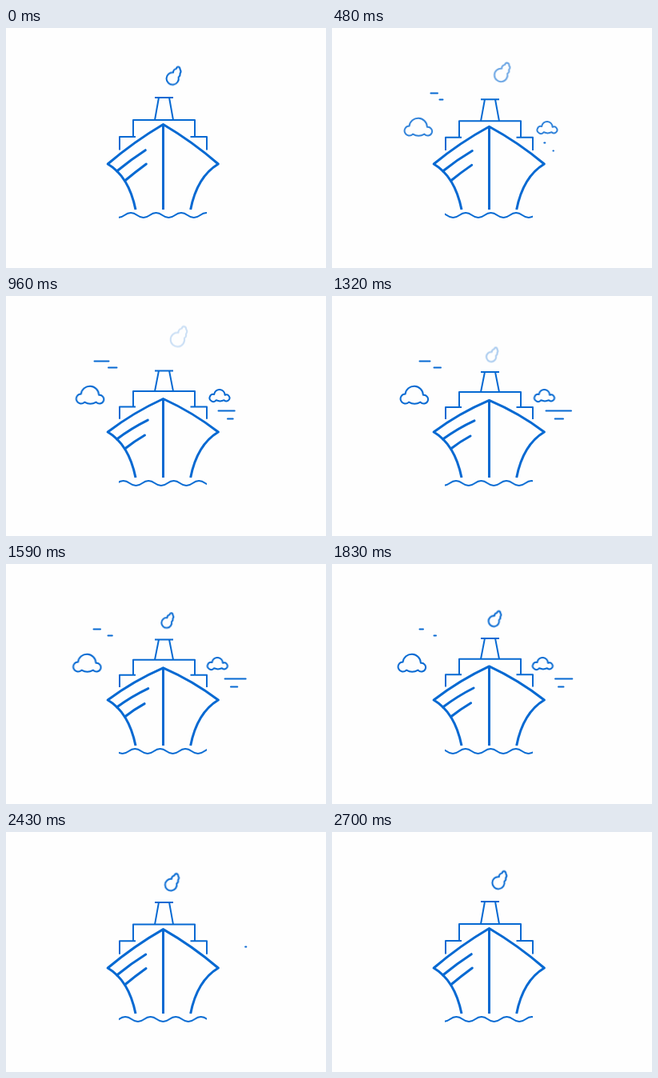
Animation of 400 by 300 pixels, one loop 2730 ms. Source, as an HTML page:

```html
<!DOCTYPE html>
<html lang="en">
<head>
<meta charset="utf-8">
<title>Ship at sea</title>
<style>
  html, body { margin: 0; width: 100%; height: 100%; overflow: hidden; background: #fefefe; }
  svg { display: block; width: 100%; height: 100%; }
  .art { fill: none; stroke: #0669d2; stroke-width: 2; stroke-linejoin: round; }
  .bold { stroke-width: 3; }
  .round { stroke-linecap: round; }

  /* Ship: each outline swings between two poses */
  .ship path { animation: 1365ms cubic-bezier(.37, 0, .63, 1) infinite alternate; }
  .ship .side { animation-name: side; }
  .ship .deck { animation-name: deck; }
  .ship .funnel { animation-name: funnel; }
  .ship .hull { animation-name: hull; }
  .ship .stripes { animation-name: stripes; }
  @keyframes side { to { d: path("M142 154V139H162M251 154V139H230.5"); } }
  @keyframes deck { to { d: path("M159 139V120H236V139M174 120H213"); } }
  @keyframes funnel { to { d: path("M186 95H209M191 95L186 120M204 95L209 120"); } }
  @keyframes hull {
    to { d: path("M162 227C156.5 200 146 181 127.2 170Q159 146.5 196.5 130.5Q234 146.5 265.3 170C247 181 236 200 230.7 227M196.5 130.5V227"); }
  }
  @keyframes stripes { to { d: path("M138.5 179Q157 165.5 178 155.8M148.5 191Q160 182 173 175"); } }

  /* Sea */
  .wave { animation: roll 1365ms linear infinite; }
  @keyframes roll { to { transform: translateX(31.5px); } }

  /* Smoke */
  .smoke {
    transform-origin: 208.1px 63.75px;
    vector-effect: non-scaling-stroke;
    animation: rise 2730ms linear -1560ms infinite, puff 2730ms linear -1560ms infinite;
  }
  @keyframes rise {
    from { transform: translate(-10.1px, 13.6px) scale(.778); }
    to { transform: translate(7.6px, -11.1px) scale(1.18); }
  }
  @keyframes puff {
    0% { opacity: 0; }
    16%, 57% { opacity: 1; }
    100% { opacity: .04; }
  }

  /* Clouds */
  .cloud {
    animation: drift 2730ms linear infinite, show 2730ms linear infinite;
  }
  .left { --a: 2.9px; --b: -13.3px; }
  .right { --a: 2px; --b: -9.4px; }
  @keyframes drift {
    from { transform: translateX(var(--a)); }
    to { transform: translateX(var(--b)); }
  }
  @keyframes show {
    0%, 9% { opacity: 0; }
    19.4%, 77% { opacity: 1; }
    88%, 100% { opacity: 0; }
  }

  /* Wind: each line grows, then shrinks towards its far end */
  .wind path { animation: 2730ms linear infinite; }
  .wind .w1 { animation-name: w1; }
  .wind .w2 { animation-name: w2; }
  .wind .w3 { animation-name: w3; }
  .wind .w4 { animation-name: w4; }
  @keyframes w1 {
    0%, 9% { opacity: 0; d: path("M132 81.5H131.5"); }
    9.01% { opacity: 1; d: path("M132 81.5H131.5"); }
    17.58% { d: path("M132 81.5H123.5"); }
    35.16% { d: path("M128.5 81.5H110.5"); }
    48.35% { d: path("M122.5 81.5H109.5"); }
    67.03% { d: path("M114 81.5H109.5"); }
    76% { opacity: 1; d: path("M110 81.5H109.5"); }
    76.01%, 100% { opacity: 0; d: path("M110 81.5H109.5"); }
  }
  @keyframes w2 {
    0%, 11% { opacity: 0; d: path("M138.5 89.5H138"); }
    11.01% { opacity: 1; d: path("M138.5 89.5H138"); }
    17.58% { d: path("M138.5 89.5H134.5"); }
    35.16% { d: path("M138.5 89.5H128"); }
    48.35% { d: path("M136 89.5H127.5"); }
    67.03% { d: path("M130 89.5H127.5"); }
    75% { opacity: 1; d: path("M128 89.5H127.5"); }
    75.01%, 100% { opacity: 0; d: path("M128 89.5H127.5"); }
  }
  @keyframes w3 {
    0%, 15.8% { opacity: 0; d: path("M265.3 143.5H265.4"); }
    15.81% { opacity: 1; d: path("M265.3 143.5H265.4"); }
    17.58% { d: path("M265.3 143.5H266.3"); }
    35.16% { d: path("M265.5 143.5H285.7"); }
    48.35% { d: path("M267.5 143.5H299"); }
    67.03% { d: path("M279 143.5H300.3"); }
    79.12% { d: path("M290 143.5H300.3"); }
    90% { opacity: 1; d: path("M300 143.5H300.3"); }
    90.01%, 100% { opacity: 0; d: path("M300 143.5H300.3"); }
  }
  @keyframes w4 {
    0%, 16.5% { opacity: 0; d: path("M276.4 153.5H276.5"); }
    16.51% { opacity: 1; d: path("M276.4 153.5H276.5"); }
    35.16% { d: path("M277 153.5H283.7"); }
    48.35% { d: path("M278.7 153.5H289"); }
    67.03% { d: path("M283 153.5H289.5"); }
    79.12% { d: path("M286.7 153.5H289.5"); }
    89% { opacity: 1; d: path("M289.3 153.5H289.5"); }
    89.01%, 100% { opacity: 0; d: path("M289.3 153.5H289.5"); }
  }
</style>
</head>
<body>
<svg viewBox="0 0 400 300">
  <clipPath id="sea"><rect x="141" y="225" width="110" height="20"/></clipPath>
  <g class="art">
    <path class="smoke" d="M209 56.2A7.6 7.6 0 1 0 215.5 62A4 4 0 0 0 217.3 57.5Q219.5 55 217.5 52.5Q217.5 49.5 215 49.3Q213 49.5 212.8 51.6Q208.8 52.5 209 56.2Z"/>

    <path class="cloud left" d="M96.5 122.5A11.25 11.25 0 0 1 118.9 123.8A5.4 5.4 0 1 1 115.5 132.6Q108 137 101 132.6A6 6 0 1 1 96.5 122.5Z"/>
    <path class="cloud right" d="M262.2 123A6.72 6.72 0 0 1 275.6 123.8A4 4 0 1 1 274.6 130.2Q269.5 132.6 264.8 130.2A4.6 4.6 0 1 1 262.2 123Z"/>

    <g class="wind round">
      <path class="w1" d="M132 81.5H131.5"/>
      <path class="w2" d="M138.5 89.5H138"/>
      <path class="w3" d="M265.3 143.5H265.4"/>
      <path class="w4" d="M276.4 153.5H276.5"/>
    </g>

    <g class="ship">
      <path class="side" d="M142 152.5V136H162M251 152.5V136H230.5"/>
      <path class="deck" d="M159 136V115H236V136M174 115H213"/>
      <path class="funnel" d="M186 87H209M191 87L186 115M204 87L209 115"/>
      <path class="hull bold" d="M162 227C156.5 200 146 181 127.2 170Q160 142 196.5 120.5Q233 142 265.3 170C247 181 236 200 230.7 227M196.5 120.5V227"/>
      <path class="stripes bold round" d="M138.5 179Q156 164.5 174.3 152.7M148.5 191Q161 180.5 175.3 170"/>
    </g>

    <g clip-path="url(#sea)">
      <path class="wave" d="M93 231c7.9 0 7.9 6 15.75 6s7.9-6 15.75-6s7.9 6 15.75 6s7.9-6 15.75-6s7.9 6 15.75 6s7.9-6 15.75-6s7.9 6 15.75 6s7.9-6 15.75-6s7.9 6 15.75 6s7.9-6 15.75-6s7.9 6 15.75 6s7.9-6 15.75-6"/>
    </g>
  </g>
</svg>
</body>
</html>
```
